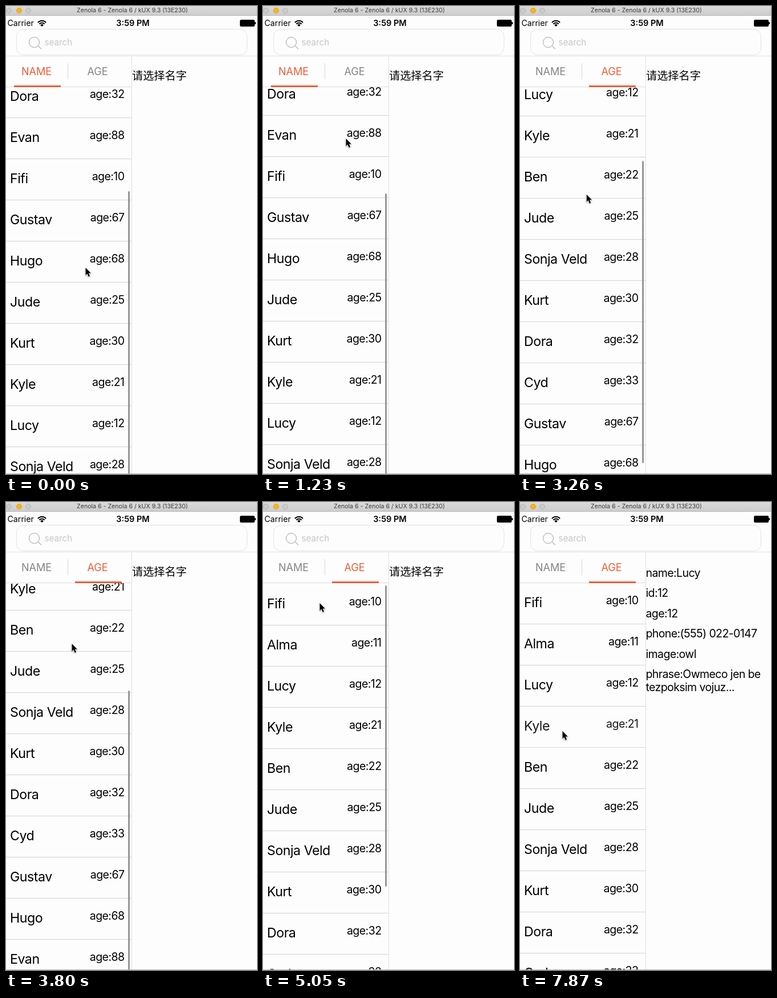
An HTML page that plays this animation: 440 by 819 pixels, repeating every 8 s.

```html
<!DOCTYPE html>
<html lang="en">
<head>
<meta charset="utf-8">
<title>Sortable list</title>
<style>
html, body { margin: 0; width: 100%; height: 100%; overflow: hidden; background: #fdfdfd; }
body { font-family: Inter, "Noto Sans CJK SC", "Noto Sans CJK", sans-serif; color: #000; }
div { position: absolute; box-sizing: border-box; }
.text { line-height: 0; white-space: pre; }
#stage { left: 0; top: 0; width: 440px; height: 819px; overflow: hidden; }
#list { left: 0; top: 142px; width: 220px; height: 677px; overflow: hidden; }
#list > div { left: 0; top: 0; width: 220px; }
#wifi {
  left: 52px; top: 24px; width: 22px; height: 12px;
  background: radial-gradient(circle at 11px 11.5px, #000 3.4px, transparent 3.8px 4.8px,
    #000 5.2px 6.8px, transparent 7.2px 8.4px, #000 8.8px 10.4px, transparent 10.8px);
  clip-path: polygon(11px 12px, -1px 0, 23px 0);
}
#cursor {
  left: 0; top: 0;
  filter: drop-shadow(1px 0 #fff) drop-shadow(-1px 0 #fff) drop-shadow(0 1px 1px rgba(0, 0, 0, .4));
}
#cursor div {
  width: 10px; height: 16px; background: #000;
  clip-path: polygon(0.5px 0, 0.5px 13px, 3.4px 10.4px, 5.6px 15.6px, 8px 14.6px, 5.8px 9.5px, 9.8px 9.5px);
}
</style>
</head>
<body>
<div id="stage"></div>
<script>
const LOOP = 8000, ROW = 72, MAX = 234;
const ORANGE = '#f25c38', GREY = '#858585';

const byName = [['Alma', 11], ['Ben', 22], ['Cyd', 33], ['Dora', 32], ['Evan', 88],
  ['Fifi', 10], ['Gustav', 67], ['Hugo', 68], ['Jude', 25], ['Kurt', 30],
  ['Kyle', 21], ['Lucy', 12], ['Sonja Veld', 28]]
  .map(([name, age], i) => ({ name, age, id: i + 1 }));
const byAge = [...byName].sort((a, b) => a.age - b.age);

// The picture advances in bursts: [start, end, steps]
const bursts = [[0, 0, 1], [120, 1080, 8], [1230, 2160, 8], [2310, 2310, 1], [2590, 3530, 8],
  [3670, 4650, 8], [4780, 5350, 5], [5630, 6200, 5], [6480, 6630, 2], [6910, 7030, 2], [7330, 7870, 5]];
const ticks = bursts.flatMap(([a, b, n]) =>
  Array.from({ length: n }, (_, i) => a + (n > 1 ? (b - a) * i / (n - 1) : 0)));

const cursorKeys = [[0, 139, 458], [120, 138, 452], [650, 144, 240], [1230, 145, 232],
  [1400, 145, 232], [2160, 162, 120], [2310, 162, 113], [2500, 162, 113], [3000, 118, 460],
  [3450, 115, 250], [3800, 115, 248], [4000, 115, 248], [4450, 111, 430], [5050, 99, 177],
  [5630, 99, 177], [6200, 92, 262], [6800, 92, 262], [7030, 74, 340], [7330, 74, 340], [7800, 74, 401]];
const scrollKeys = [[0, MAX], [120, 237], [650, 320], [1230, 238], [1360, MAX], [2300, MAX], [2301, 0],
  [2950, 0], [3500, 275], [3800, 240], [3950, MAX], [4050, MAX], [4450, 20], [4650, -45], [5050, -2], [5200, 0]];
const barKeys = [[0, 1], [1500, 1], [1850, 0], [2950, 0], [3050, 1], [5200, 1], [5350, 0]];
const taps = [5630, 6480, 7330, 7870];

// Eased value(s) of a key list at time t
function track(keys, t) {
  const i = keys.findIndex(k => k[0] > t);
  if (i < 0) return keys[keys.length - 1].slice(1);
  const a = keys[i - 1], b = keys[i], u = (t - a[0]) / (b[0] - a[0]), e = u * u * (3 - 2 * u);
  return a.slice(1).map((v, j) => v + (b[j + 1] - v) * e);
}

const stage = document.getElementById('stage');

function add(parent, style = {}, id = '') {
  const el = parent.appendChild(document.createElement('div'));
  el.id = id;
  Object.assign(el.style, style);
  return el;
}

function box(parent, x, y, w, h, background, style = {}) {
  return add(parent, { left: x + 'px', top: y + 'px', width: w + 'px', height: h + 'px', background, ...style });
}

// Text with its baseline at y
function text(parent, s, x, y, size, style = {}) {
  const el = add(parent, { left: x + 'px', top: y - .364 * size + 'px', fontSize: size + 'px', ...style });
  el.className = 'text';
  el.textContent = s;
  return el;
}

function disc(x, y, r, background, edge) {
  box(stage, x - r, y - r, 2 * r, 2 * r, background, { borderRadius: '50%', border: '1px solid ' + edge });
}

function buildList(people) {
  const el = add(list);
  el.rows = people.map((p, i) => {
    const row = box(el, 0, i * ROW, 220, ROW, 'none');
    text(row, p.name, 7, 42, 23.2, { letterSpacing: '-.5px' });
    text(row, 'age:' + p.age, 0, 37, 19.5, { left: 'auto', right: '12.5px', letterSpacing: '-.55px' });
    box(row, 0, 71, 220, 1, '#d4d4d4');
    return row;
  });
  return el;
}

function buildHeader() {
  box(stage, 0, 0, 440, 17, 'linear-gradient(#dadada, #cdcdcd)', { borderBottom: '1px solid #b4b4b4' });
  disc(5, 8, 5, '#cbcbcb', '#b3b3b3');
  disc(22.5, 8, 5, '#fcb40f', '#e0a023');
  disc(39, 8, 5, '#cbcbcb', '#b3b3b3');
  const middle = { width: '443px', textAlign: 'center' };
  text(stage, 'Zenola 6 - Zenola 6 / kUX 9.3 (13E230)', 0, 12, 10.6, { ...middle, color: '#3c3c3c' });

  text(stage, 'Carrier', 2.5, 35, 14.2);
  text(stage, '3:59 PM', 1, 35, 14.5, { ...middle, fontWeight: 600 });
  add(stage, {}, 'wifi');
  box(stage, 410, 24, 25.5, 12, '#000', { borderRadius: '2.5px' });
  box(stage, 436, 28, 2, 4, '#000', { borderRadius: '1px' });

  box(stage, 18, 40, 405, 46, 'none', { border: '1px solid #e2e2e2', borderRadius: '13px' });
  box(stage, 39.5, 54, 19, 19, 'none', { border: '1px solid #a0a0a0', borderRadius: '50%' });
  box(stage, 54.5, 72, 8, 1.2, '#a5a5a5', { transform: 'rotate(45deg)' });
  text(stage, 'search', 67.5, 70, 15.2, { color: '#c6c6c6' });
  box(stage, 0, 87, 440, 1, '#e2e2e2');
}

const list = add(stage, {}, 'list');
const lists = [buildList(byName), buildList(byAge)];
const bar = box(list, 213.5, 0, 3.2, 0, '#979797', { borderRadius: '2px' });

buildHeader();
box(stage, 0, 141, 220, 1, '#dcdcdc');
const tabs = [text(stage, 'NAME', 27, 122, 18), text(stage, 'AGE', 142.5, 122, 18)];
box(stage, 108, 100, 1, 28, '#d8d8d8');
const underline = box(stage, 0, 139, 82, 2.5, ORANGE);
box(stage, 220, 88, 1, 731, '#e0e0e0');
const prompt = text(stage, '请选择名字', 221, 129, 19.2);
const lines = Array.from({ length: 7 }, (_, i) =>
  text(stage, '', 220.5, i < 6 ? 131 + i * 35.4 : 331, 19.5, { letterSpacing: '-.6px' }));
box(stage, 0, 818, 440, 1, '#bdbdbd');
const cursor = add(stage, {}, 'cursor');
add(cursor);

function showDetail(p) {
  prompt.hidden = !!p;
  const rows = p ? ['name:' + p.name, 'id:' + p.id, 'age:' + p.age, `phone:(555) 0${p.id + 10}-0147`,
    'image:owl', 'phrase:Owmeco jen be', 'tezpoksim vojuz...'] : [];
  lines.forEach((el, i) => el.textContent = rows[i] || '');
}

function showList(tab, scroll, alpha, pressed) {
  lists.forEach((el, i) => {
    el.hidden = i !== tab;
    el.style.transform = `translateY(${-Math.round(scroll)}px)`;
    el.rows.forEach((row, j) => row.style.opacity = j === pressed ? .9 : 1);
  });
  tabs.forEach((el, i) => el.style.color = i === tab ? ORANGE : GREY);
  underline.style.left = (tab ? 120.5 : 13.5) + 'px';

  const over = Math.max(0, scroll - MAX), under = Math.max(0, -scroll);
  const inside = Math.min(MAX, Math.max(0, scroll));
  bar.style.top = 4 + inside * .761 + over + 'px';
  bar.style.height = 529 - over - under + 'px';
  bar.style.opacity = alpha;
}

function draw(now) {
  const t = ticks.filter(k => k <= now % LOOP + 18).pop();
  const pressed = taps.findIndex(k => t >= k && t < k + 100);
  const shown = taps.filter(k => t >= k + 100).length - 1;
  showList(t >= 2310 ? 1 : 0, track(scrollKeys, t)[0], track(barKeys, t)[0], pressed);
  showDetail(byAge[shown]);
  const [x, y] = track(cursorKeys, t);
  cursor.style.transform = `translate(${x}px, ${y}px)`;
}

const start = performance.now();
(function frame() {
  draw(performance.now() - start);
  requestAnimationFrame(frame);
})();
</script>
</body>
</html>
```
